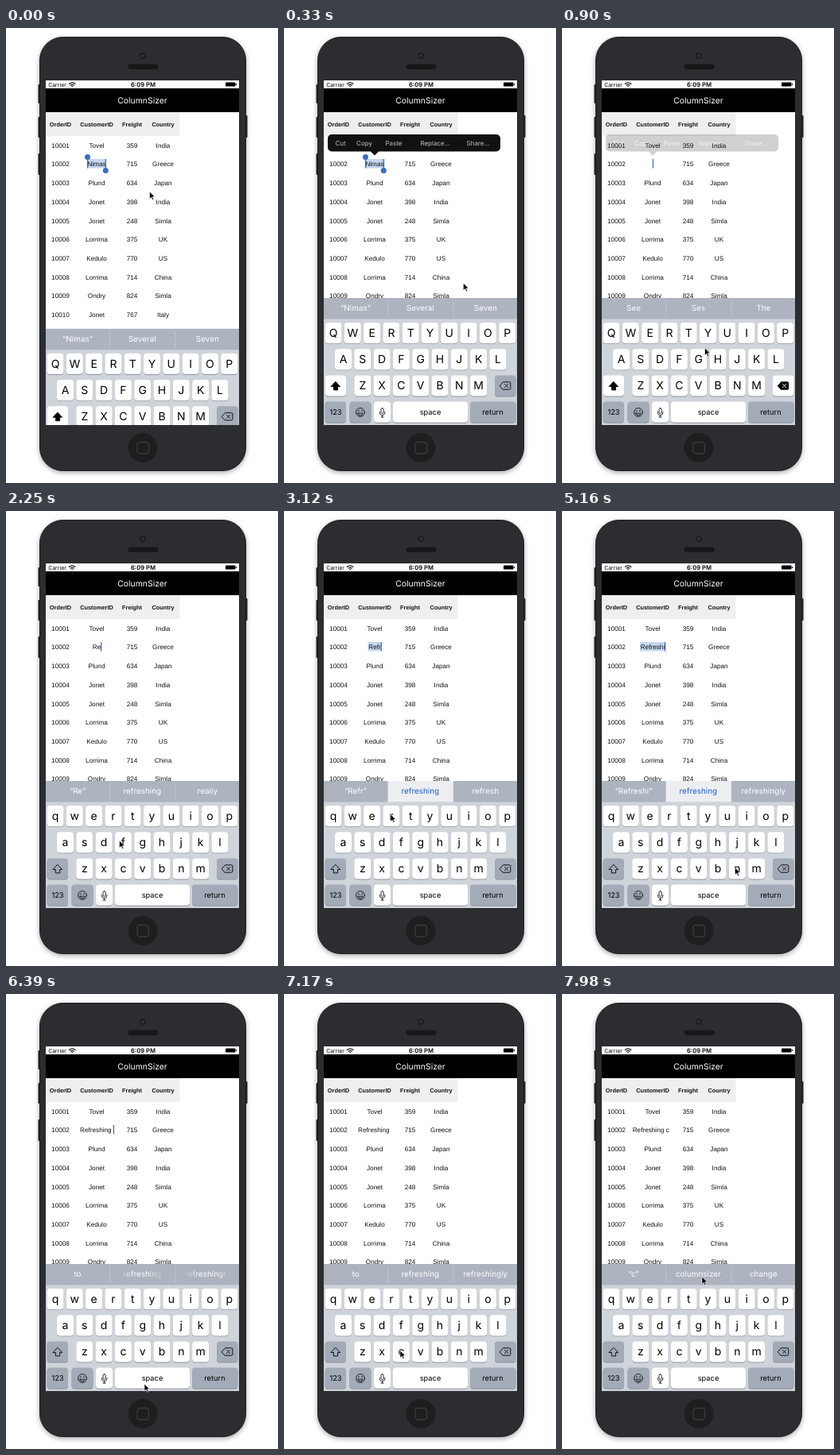
Animation, 342 px wide and 573 px high, one loop 8000 ms. Source, as an HTML page:

```html
<!DOCTYPE html>
<html lang="en">
<head>
<meta charset="utf-8">
<title>Typing in a table cell</title>
<style>
  html, body { margin: 0; width: 100%; height: 100%; overflow: hidden; background: #fff; }
  svg { display: block; width: 342px; height: 573px; }
  text { text-anchor: middle; white-space: pre; text-rendering: geometricPrecision; }
  .cell { font: 8.2px "Liberation Sans", Arial, sans-serif; fill: #111; }
  .head { font: bold 7.35px "Liberation Sans", Arial, sans-serif; fill: #111; }
  .ui { font-family: Inter, Roboto, sans-serif; }
  .line { fill: none; stroke: #111; stroke-linecap: round; stroke-linejoin: round; }
</style>
</head>
<body>
<svg id="stage" viewBox="0 0 342 573">
  <defs>
    <filter id="soft" x="-20%" y="-20%" width="140%" height="140%"><feGaussianBlur stdDeviation="3"/></filter>
    <filter id="lift" x="-30%" y="-30%" width="160%" height="160%"><feDropShadow dx="0" dy="1" stdDeviation="1.3" flood-opacity=".35"/></filter>
    <clipPath id="screen"><rect x="50" y="66" width="243" height="434"/></clipPath>
  </defs>

  <rect x="42" y="13" width="260" height="547" rx="30" opacity=".35" filter="url(#soft)"/>
  <g fill="#1d1e20">
    <rect x="40.500" y="71" width="4" height="24" rx="1"/>
    <rect x="40.500" y="112" width="4" height="26" rx="1"/>
    <rect x="40.500" y="158" width="4" height="27" rx="1"/>
    <rect x="299.500" y="110" width="4" height="28" rx="1"/>
  </g>
  <rect x="42.500" y="11.500" width="259" height="546" rx="29" fill="#2c2d30" stroke="#1b1c1e"/>
  <circle cx="172" cy="35" r="4" fill="#1e1f21"/>
  <circle cx="172" cy="35" r="1.800" fill="#34363a"/>
  <rect x="153.500" y="45.500" width="38" height="6.500" rx="3.250" fill="#17181a"/>
  <circle cx="172" cy="528.500" r="18.500" fill="#1d1e20"/>
  <rect x="165" y="521.500" width="14.500" height="14.500" rx="3.500" fill="none" stroke="#393a3d" stroke-width="1.400"/>

  <g clip-path="url(#screen)">
    <rect x="50" y="66" width="243" height="434" fill="#fff"/>
    <g class="ui">
      <text x="64.500" y="73.800" font-size="6.900">Carrier</text>
      <text x="172.500" y="74" font-size="7.600" font-weight="600">6:09 PM</text>
    </g>
    <path class="line" stroke-width="1.300" d="M79.500 70.300q3.700-3 7.400 0M81.200 72.100q2-1.500 4 0"/>
    <circle cx="83.200" cy="73.700" r=".8"/>
    <rect x="276" y="68.500" width="12.500" height="5" rx="1"/>
    <rect x="289.200" y="70" width="1" height="2"/>
    <rect x="50" y="76" width="243" height="30"/>
    <text class="ui" x="171.500" y="94.800" font-size="10.400" fill="#fff">ColumnSizer</text>
    <rect x="50" y="106" width="168.500" height="30" fill="#efefef"/>
    <g id="table"></g>
    <g id="edit">
      <rect id="mark" y="165" height="11.500" fill="#c4d6ee"/>
      <text id="word" class="cell" y="173.600"></text>
      <rect id="caret" y="165" width="1.300" height="11.500" fill="#3a70d4"/>
      <g id="handles" fill="#3a6dc4">
        <circle cx="102.500" cy="162.500" r="3.500"/><rect x="102" y="163" width="1.200" height="13.500"/>
        <circle cx="125.300" cy="179.500" r="3.500"/><rect x="124.700" y="165" width="1.200" height="13.500"/>
      </g>
    </g>
    <g id="menu" class="ui" font-size="8" fill="#fff" fill-opacity=".75">
      <path d="M60 134H267a5 5 0 0 1 5 5V150.500a5 5 0 0 1-5 5H119l-5 5-5-5H60a5 5 0 0 1-5-5V139a5 5 0 0 1 5-5z" fill="#111" fill-opacity="1"/>
    </g>
    <g id="board" class="ui">
      <rect x="50" y="340" width="243" height="160" fill="#cfd3da"/>
      <rect x="50" y="340" width="243" height="26.500" fill="#adb4c0"/>
      <rect id="chip" x="130.500" y="340" width="82.500" height="26.500" fill="#edeef1"/>
      <path d="M130.500 343v21M213 343v21" stroke="#c3c8d1" stroke-width=".8"/>
      <g id="hints" font-size="9.900"></g>
      <g id="keys"></g>
      <path id="shift" d="M65 445.500l5.600 6h-3v4.400h-5.200v-4.400h-3z" class="line" stroke-width="1"/>
      <g id="erase" class="line">
        <path d="M271.500 450.500l4-4.700h8a1.300 1.300 0 0 1 1.300 1.300v6.800a1.300 1.300 0 0 1-1.300 1.300h-8z"/>
        <path id="cross" d="M277.500 448.400l4.200 4.200m0-4.200l-4.200 4.200"/>
      </g>
      <g class="line" stroke-width=".9">
        <circle cx="96" cy="484" r="5.400"/>
        <path d="M92.900 485.200h6.200q-.8 2.800-3.100 2.800t-3.100-2.800z"/>
        <path d="M94 482v.4M98 482v.4" stroke-width="1.300"/>
        <rect x="122" y="478.800" width="3.200" height="6.600" rx="1.600"/>
        <path d="M120.300 483.500v.8a3.300 3.300 0 0 0 6.600 0v-.8M123.600 487.700v2.300m-1.600 0h3.200"/>
      </g>
      <g id="balloon" filter="url(#lift)">
        <path d="M-13-37H13a5 5 0 0 1 5 5V-13c0 6-7.500 7-7.500 13V22.500a4 4 0 0 1-4 4H-6.500a4 4 0 0 1-4-4V0c0-6-7.500-7-7.500-13V-32a5 5 0 0 1 5-5z" fill="#fff"/>
        <text id="big" y="-13.500" font-size="21"></text>
      </g>
    </g>
  </g>
  <path id="pointer" d="M0 0V9.200l2.200-2 1.500 3.300 1.500-.7-1.500-3.200h2.900z" fill="#000" stroke="#fff" stroke-width=".6"/>
</svg>

<script>
const LOOP = 8000;
const $ = id => document.getElementById(id);
const clamp = v => Math.max(0, Math.min(1, v));

function add(parent, tag, attrs, label) {
  const el = document.createElementNS("http://www.w3.org/2000/svg", tag);
  set(el, attrs);
  if (label !== undefined) el.textContent = label;
  parent.appendChild(el);
  return el;
}
function set(el, attrs) {
  for (const name in attrs) el.setAttribute(name, attrs[name]);
}
const show = (el, on) => set(el, { visibility: on ? "visible" : "hidden" });

// Table
const columns = [68.5, 114, 158.5, 197.5];
["OrderID", "CustomerID", "Freight", "Country"].forEach((name, i) =>
  add($("table"), "text", { class: "head", x: columns[i], y: 123.8 }, name));

`Tovel 359 India
- 715 Greece
Plund 634 Japan
Jonet 398 India
Jonet 248 Simla
Lorrima 375 UK
Kedulo 770 US
Lorrima 714 China
Ondry 824 Simla
Jonet 767 Italy`.split("\n").forEach((row, r) => {
  [10001 + r, ...row.split(" ")].forEach((value, c) => {
    if (value !== "-") add($("table"), "text", { class: "cell", x: columns[c], y: 150.7 + r * 23.7 }, value);
  });
});

["Cut", "Copy", "Paste", "Replace…", "Share…"].forEach((name, i) =>
  add($("menu"), "text", { x: [71, 101, 138, 190, 244][i], y: 147.8 }, name));

// Keyboard
const GRAY = "#a2abb7";
function key(x, y, w, fill = "#fff") {
  add($("keys"), "rect", { x, y: y + 0.9, width: w, height: 26.2, rx: 4, fill: "#8f949c" });
  return add($("keys"), "rect", { x, y, width: w, height: 26.2, rx: 4, fill });
}
const letters = {};
["qwertyuiop", "asdfghjkl", "zxcvbnm"].forEach((row, r) => {
  [...row].forEach((ch, i) => {
    const x = [62, 74.5, 98.8][r] + i * 24.3, y = 371 + r * 33.2;
    key(x - 10.5, y, 21);
    letters[ch] = { x, y, label: add($("keys"), "text", { x, y: y + 17.9, "font-size": 14 }) };
  });
});
const shiftKey = key(51.5, 437.4, 26.5);
const eraseKey = key(265, 437.4, 26.5, GRAY);
key(51.5, 470.6, 26.5, GRAY);
key(82.5, 470.6, 27, GRAY);
key(113, 470.6, 21);
key(137, 470.6, 94);
key(234, 470.6, 57.5, GRAY);
[["123", 65], ["space", 184], ["return", 262.5]].forEach(([name, x]) =>
  add($("keys"), "text", { x, y: 486.8, "font-size": 9.3 }, name));

// time, text, suggestions, whether a correction is offered
const states = [
  [0, "Nimas", "“Nimas” Several Seven"],
  [840, "", "See Ses The"],
  [1330, "R", "“R” Read Really"],
  [1880, "Re", "“Re” refreshing really"],
  [2520, "Ref", "“Ref” refreshing refer"],
  [2900, "Refr", "“Refr” refreshing refresh", true],
  [3380, "Refre", "“Refre” refreshing refresh", true],
  [3780, "Refres", "“Refres” refreshing refresh", true],
  [4200, "Refresh", "“Refresh” refreshing refresh"],
  [4850, "Refreshi", "“Refreshi” refreshing refreshingly", true],
  [5360, "Refreshin", "“Refreshin” refreshing refreshingly", true],
  [5880, "Refreshing", "“Refreshing” refreshing refreshingly"],
  [6310, "Refreshing ", "to refreshing refreshingly"],
  [7330, "Refreshing c", "“c” columnsizer change"]
];

// time, x, y of the pointer tip
const path = [
  [0, 180.5, 206], [60, 180.5, 206], [620, 275, 448], [780, 275, 448], [900, 179.5, 403],
  [1200, 134, 382], [1400, 134, 382], [1750, 111, 382], [1950, 111, 382], [2250, 142.5, 415],
  [2540, 145, 415], [2800, 134, 382], [3120, 134, 382], [3280, 111, 382], [3420, 111, 382],
  [3660, 99, 415], [3820, 99, 415], [4080, 197, 412], [4240, 197, 412], [4720, 231, 382],
  [4880, 231, 382], [5160, 217.5, 449], [5400, 217.5, 449], [5760, 171, 414], [5920, 171, 414],
  [6270, 174, 469], [6330, 174, 471], [6390, 174, 491], [6640, 174, 491], [7150, 146, 449],
  [7380, 146, 449], [7960, 176, 357], [8000, 176, 355.5]
];

function pointerAt(t) {
  const i = path.findIndex(p => p[0] > t);
  const [t0, x0, y0] = path[i - 1], [t1, x1, y1] = path[i];
  const k = (t - t0) / (t1 - t0), e = k * k * (3 - 2 * k);
  return [x0 + (x1 - x0) * e, y0 + (y1 - y0) * e];
}

let shown = -1, lastCaps = null;

function setText(index) {
  if (index === shown) return;
  shown = index;
  const [, text, hints, offer] = states[index];
  const mid = text.length > 11 ? 111.7 : 114;
  $("word").textContent = text;
  set($("word"), { x: mid });
  const width = text ? $("word").getComputedTextLength() : 0;
  set($("caret"), { x: mid + width / 2 - 0.2 });
  set($("mark"), { x: mid - width / 2 - 0.8, width: width + 1.6 });
  show($("mark"), index === 0 || offer);
  show($("handles"), index === 0);
  show($("chip"), offer);
  $("hints").replaceChildren();
  hints.split(" ").forEach((hint, i) => {
    const fill = offer && i === 1 ? "#1f60d0" : "#fff";
    const line = add($("hints"), "text", { x: [90, 171.3, 253.3][i], y: 356, fill });
    [...hint].forEach(ch => add(line, "tspan", {}, ch));
  });
}

// Suggestions appear from the middle letter outwards.
function revealHints(age) {
  for (const line of $("hints").children) {
    const mid = (line.children.length - 1) / 2;
    [...line.children].forEach((letter, i) =>
      set(letter, { "fill-opacity": shown ? clamp(age / 50 - Math.abs(i - mid) * 0.28) : 1 }));
  }
}

function setCaps(caps) {
  if (caps === lastCaps) return;
  lastCaps = caps;
  for (const ch in letters) letters[ch].label.textContent = caps ? ch.toUpperCase() : ch;
  set(shiftKey, { fill: caps ? "#fff" : GRAY });
  $("shift").style.fill = caps ? "#000" : "none";
}

function setBalloon(t, caps) {
  const pressed = states.find(([at, text], i) => i > 1 && !text.endsWith(" ") && t >= at - 90 && t < at + 50);
  show($("balloon"), pressed);
  if (!pressed) return;
  const ch = pressed[1].slice(-1).toLowerCase(), { x, y } = letters[ch];
  set($("balloon"), { transform: `translate(${x} ${y})` });
  $("big").textContent = caps ? ch.toUpperCase() : ch;
}

function draw(t) {
  const index = states.findLastIndex(s => s[0] <= t);
  const age = t - states[index][0];
  setText(index);
  revealHints(age);
  show($("caret"), index > 0 && age % 1000 < 550);

  const caps = t < 1400;
  setCaps(caps);
  setBalloon(t, caps);

  const erasing = t > 760 && t < 960;
  set(eraseKey, { fill: erasing ? "#fff" : GRAY });
  $("erase").firstElementChild.style.fill = erasing ? "#000" : "none";
  $("cross").style.stroke = erasing ? "#fff" : "#111";

  const rise = 39.3 * (1 - clamp(t / 160)) ** 2;
  set($("board"), { transform: `translate(0 ${rise})` });
  set($("menu"), { opacity: clamp((t - 180) / 150) * clamp((930 - t) / 150) });
  set($("pointer"), { transform: `translate(${pointerAt(t)})` });
}

function tick() {
  draw(performance.now() % LOOP);
  requestAnimationFrame(tick);
}
tick();
</script>
</body>
</html>
```
